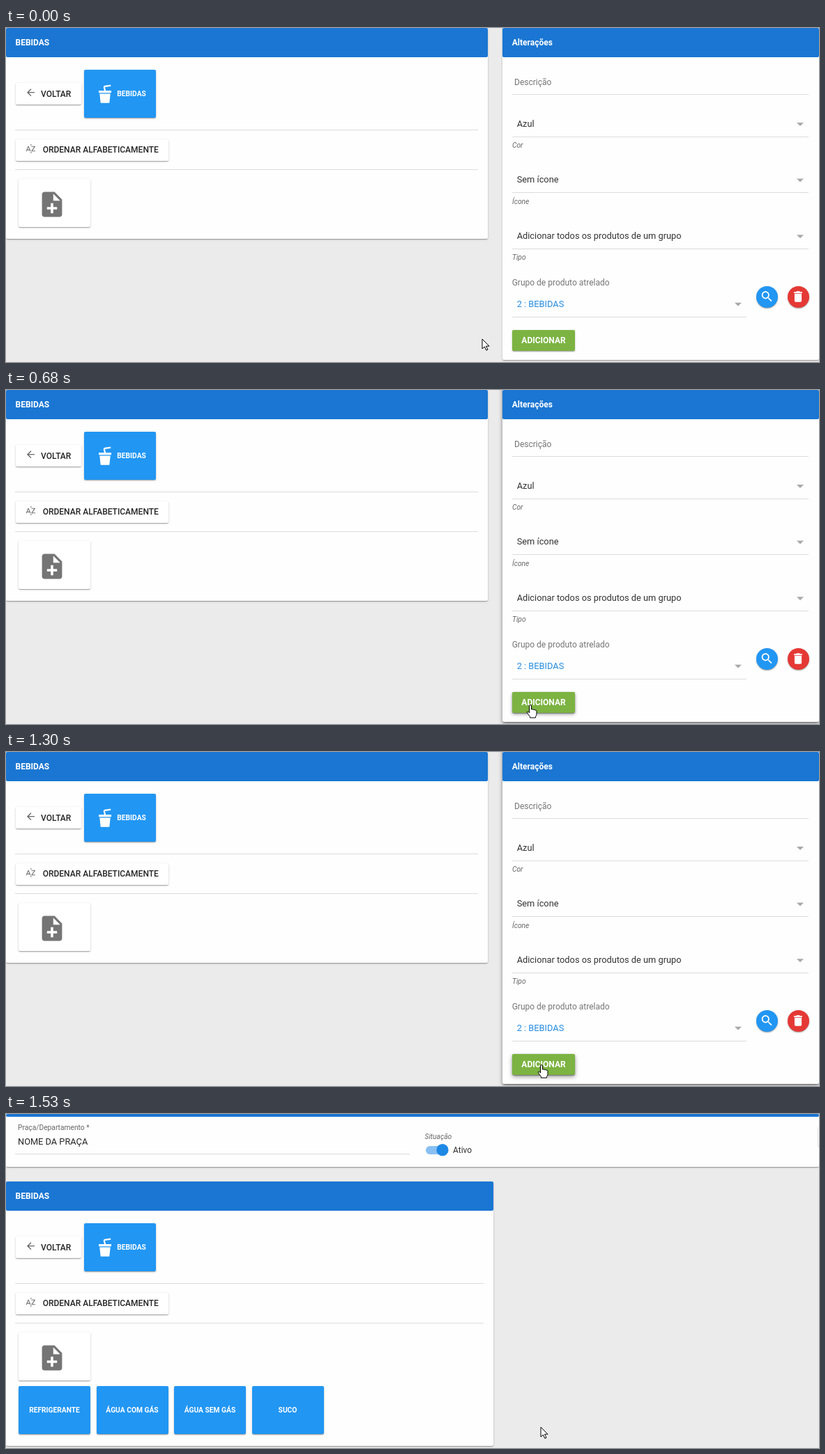
Animation of 1166x480 px, one loop 3070 ms. Source, as an HTML page:

```html
<!DOCTYPE html>
<html lang="pt">
<head>
<meta charset="utf-8">
<style>
html, body { margin: 0; width: 100%; height: 100%; overflow: hidden; background: #ebebeb; }
.scene, .scene div, svg, #dim { position: absolute; left: 0; top: 0; }
.scene, svg, #dim { width: 1166px; height: 480px; overflow: hidden; }
.scene div { border-radius: 2px; }
#dim { background: rgba(0, 0, 0, .1); }
text { font-family: Roboto, sans-serif; white-space: pre; }
</style>
</head>
<body>
<div class="scene" id="edit"></div>
<div class="scene" id="result"></div>
<div id="dim"></div>
<svg><path id="cursor" fill="#fff" stroke="#000" stroke-linejoin="round"/></svg>
<script>
const $ = id => document.getElementById(id);
const BLUE = '#2196f3', HEADER = '#1a76d2', DARK = '#252525', GRAY = '#757575';
const LOW = '0 1px 3px rgba(0,0,0,.2), 0 1px 1px rgba(0,0,0,.14), 0 2px 1px -1px rgba(0,0,0,.12)';
const ICONS = {
  back: 'M20 11H7.83l5.59-5.59L12 4l-8 8 8 8 1.41-1.41L7.83 13H20z',
  sort: 'M14.94 4.66h-4.72l2.36-2.36zm-4.69 14.71h4.66l-2.33 2.33zM6.1 6.27L1.6 17.73h1.84l.92-2.45h5.11l.92 2.45h1.84L7.74 6.27zm-1.13 7.37l1.94-5.18 1.94 5.18zm10.76 2.5h6.12v1.59h-8.53v-1.29l5.92-8.56h-5.88v-1.6h8.3v1.26z',
  add: 'M14 2H6c-1.1 0-2 .9-2 2v16c0 1.1.9 2 2 2h12c1.1 0 2-.9 2-2V8zm2 14h-3v3h-2v-3H8v-2h3v-3h2v3h3zm-3-7V3.5L18.5 9z',
  search: 'M15.5 14h-.79l-.28-.27C15.41 12.59 16 11.11 16 9.5 16 5.91 13.09 3 9.5 3S3 5.91 3 9.5 5.91 16 9.5 16c1.61 0 3.09-.59 4.23-1.57l.27.28v.79l5 4.99L20.49 19zm-6 0C7.01 14 5 11.99 5 9.5S7.01 5 9.5 5 14 7.01 14 9.5 11.99 14 9.5 14z',
  trash: 'M6 19c0 1.1.9 2 2 2h8c1.1 0 2-.9 2-2V7H6zM19 4h-3.5l-1-1h-5l-1 1H5v2h14z'
};
const ARROW = 'M0 0V14L3.3 11L5.8 16.2L8 15.2L5.5 10.2H10Z';
const HAND = 'M-1.5 11.5V1.5Q-1.5 0 0 0T1.5 1.5V6.5Q3 5.5 4.5 7Q6 6.2 7.3 7.8Q9 7.5 9 9V13Q9 15 7.5 17V18.5H-.5V17L-4.5 11.5Q-5.5 9.5-3.5 9.5Z';

// Each scene collects HTML boxes below one SVG layer of text and icons.
let boxes, art;
const box = (x, y, w, h, color, shadow = LOW, extra = '') =>
  boxes += `<div ${extra} style="left:${x}px;top:${y}px;width:${w}px;height:${h}px;background:${color};box-shadow:${shadow}"></div>`;
const disc = (x, y, r, color, shadow = LOW) =>
  boxes += `<div style="left:${x - r}px;top:${y - r}px;width:${2 * r}px;height:${2 * r}px;border-radius:50%;background:${color};box-shadow:${shadow}"></div>`;
const text = (x, y, str, size = 12, color = DARK, weight = 400, extra = '') =>
  art += `<text x="${x}" y="${y}" font-size="${size}" fill="${color}" font-weight="${weight}" ${extra}>${str}</text>`;
const hint = (x, y, str) => text(x, y, str, 10.24, '#666', 400, 'font-style="italic"');
const line = (x1, x2, y) => art += `<path d="M${x1} ${y}H${x2}" stroke="#dcdcdc"/>`;
const icon = (name, x, y, scale, color) =>
  art += `<path d="${ICONS[name]}" fill="${color}" transform="translate(${x} ${y}) scale(${scale})"/>`;
const caret = (x, y) => art += `<path d="M${x - 5} ${y - 2.5}h10l-5 5z" fill="#a9a9a9"/>`;

function tile(x, y, label) {
  box(x, y, 103, 68.5, BLUE);
  text(x + 51.5, y + 38, label, 10.24, '#fff', 700, 'text-anchor="middle"');
}

function menuPanel(top, width, height) {
  box(0, top, width, height, '#fefefe');
  box(0, top, width, 42, HEADER, 'none');
  text(13.5, top + 25, 'BEBIDAS', 12, '#fff', 700);
  box(13.5, top + 79, 94, 30.5, '#fff');
  icon('back', 27.3, top + 84.5, .68, '#666');
  text(50, top + 98.5, 'VOLTAR', 12, DARK, 500);
  box(111.5, top + 60, 103, 68.5, BLUE);
  art += `<g transform="translate(0 ${top})" fill="#fff">
    <path d="M133 90h18v3.2h-18zM134.3 94.5h15.4l-1.4 13.3h-12.6z"/>
    <path d="M142.2 90.5l-1.4-5.2q-.2-1.2 1-1.5l8.4-1.2" fill="none" stroke="#fff" stroke-width="2.2"/></g>`;
  text(159.3, top + 98, 'BEBIDAS', 10.24, '#fff', 700);
  line(13, width - 14, top + 146.5);
  box(13.5, top + 160, 219, 30.5, '#fff');
  icon('sort', 27.5, top + 165.5, .667, '#757575');
  text(52.7, top + 179, 'ORDENAR ALFABETICAMENTE', 12, DARK, 500);
  line(13, width - 14, top + 203.5);
  box(18, top + 217, 103, 68.5, '#fff');
  icon('add', 44.4, top + 232, 1.8, GRAY);
}

function editScene() {
  menuPanel(0, 691, 303);
  box(712, -20, 454, 497, '#fefefe', LOW, 'id="form"');
  box(712, 0, 454, 42, HEADER, 'none');
  text(725.7, 25, 'Alterações', 12, '#fff', 700);
  text(729, 81.5, 'Descrição', 12, GRAY);
  line(726, 1151, 95.5);
  [['Azul', 'Cor'], ['Sem ícone', 'Ícone'], ['Adicionar todos os produtos de um grupo', 'Tipo']]
    .forEach(([value, name], i) => {
      const y = i * 80.6;
      text(732.7, 141.7 + y, value, 12.8, '#333');
      caret(1139, 138.5 + y);
      line(726, 1151, Math.floor(156 + y) + .5);
      hint(726, 172 + y, name);
    });
  text(725.7, 370.3, 'Grupo de produto atrelado', 12, GRAY);
  text(732.7, 400.5, '2 : BEBIDAS', 12.8, '#258ce0');
  caret(1050, 397.3);
  line(726, 1062, 415.5);
  disc(1091.3, 386, 15.5, BLUE);
  icon('search', 1081.2, 375.8, .85, '#fff');
  disc(1136, 386, 15.5, '#e53935');
  icon('trash', 1125.8, 375.8, .85, '#fff');
  box(726, 434, 90, 30, '#7cb342', LOW, 'id="submit"');
  text(739.3, 452.7, 'ADICIONAR', 12, '#fff', 700);
}

function resultScene() {
  box(0, 0, 1166, 76, '#fefefe');
  box(0, 0, 1166, 4, HEADER, 'none');
  text(17, 23, 'Praça/Departamento *', 10.24, '#666');
  text(17, 43.7, 'NOME DA PRAÇA', 12.8);
  line(13, 579, 57.5);
  hint(600.5, 36, 'Situação');
  art += '<rect x="602" y="46" width="30" height="12" rx="6" fill="#89c0f2"/><circle cx="626" cy="51.7" r="8.6" fill="#1e88e5"/>';
  text(641, 55.8, 'Ativo', 12, '#333');
  box(1165, 18, 20, 28, '#fff');
  menuPanel(97, 699, 380);
  ['REFRIGERANTE', 'ÁGUA COM GÁS', 'ÁGUA SEM GÁS', 'SUCO']
    .forEach((label, i) => tile(18 + i * 111.5, 391, label));
}

function build(id, draw) {
  boxes = art = '';
  draw();
  $(id).innerHTML = `${boxes}<svg>${art}</svg>`;
}
build('edit', editScene);
build('result', resultScene);

// Held steps: time, pointer x, pointer y, hand pointer
const STEPS = [
  [0, 683, 447], [300, 694, 449], [360, 706, 450], [440, 722, 451],
  [520, 737, 452, 1], [600, 747, 453, 1], [680, 752, 452.5, 1], [820, 753, 452.5, 1],
  [900, 758, 451.5, 1], [970, 765, 450, 1], [1050, 768, 449.7, 1],
  [1300, 768, 449.7, 1], [1370, 768, 449.7, 1], [1450, 767, 450], [1530, 767, 450]
];
const ramp = (t, from, to) => Math.min(1, Math.max(0, (t - from) / (to - from)));
const lifted = k => k ? `0 ${1 + 2 * k}px ${3 + 3 * k}px rgba(0,0,0,${.22 + .13 * k}), ${LOW}` : LOW;

function frame(now) {
  const time = now % 3070;
  const [t, x, y, hand] = STEPS.filter(s => s[0] <= time).pop();
  $('edit').style.display = t < 1530 ? '' : 'none';
  $('result').style.display = t < 1530 ? 'none' : '';
  $('dim').style.display = t === 1450 ? '' : 'none';
  $('form').style.boxShadow = lifted(ramp(t, 360, 680));
  $('submit').style.boxShadow = lifted(ramp(t, 440, 680) * .6 + ramp(t, 1230, 1370) * .8);
  $('cursor').setAttribute('d', hand ? HAND : ARROW);
  $('cursor').setAttribute('transform', `translate(${x} ${y})`);
  requestAnimationFrame(frame);
}
const start = performance.now();
requestAnimationFrame(function tick() {
  frame(Math.max(0, performance.now() - start));
});
</script>
</body>
</html>
```
